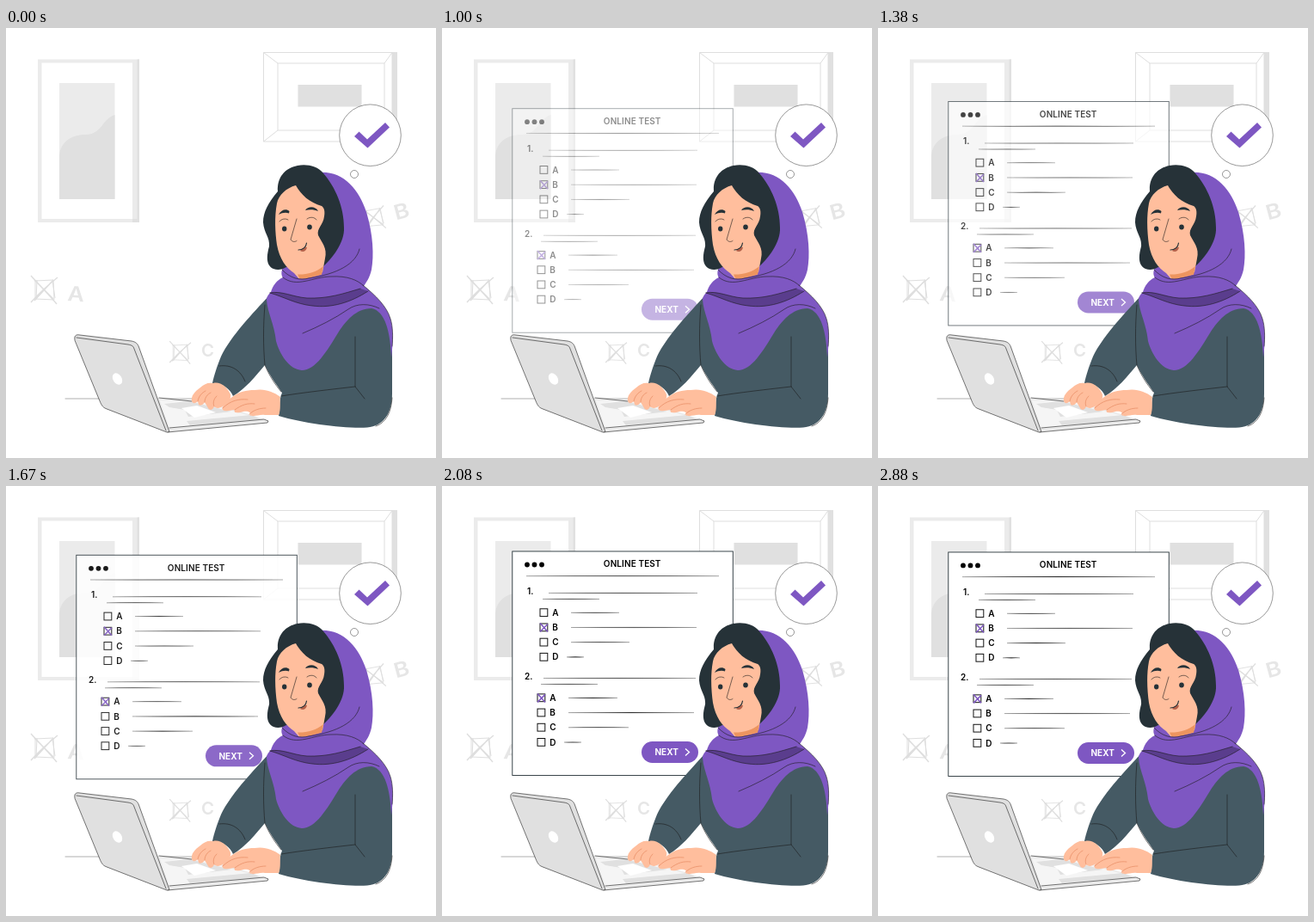
An HTML page that plays this animation: 500 by 500 pixels, repeating every 2.93 s.

```html
<!DOCTYPE html>
<html lang="en">
<head>
<meta charset="utf-8">
<title>Online test</title>
<style>
  html, body { margin: 0; width: 100%; height: 100%; overflow: hidden; background: #fff; }
  svg { display: block; width: 100%; height: 100%; }
  text { font-family: Inter, "Open Sans", sans-serif; font-weight: 600; }
  .ink { fill: none; stroke: #1c1c1c; stroke-width: .6; stroke-linecap: round; stroke-linejoin: round; }
  .pale { fill: none; stroke: #dedede; stroke-width: 1; }
  .skinline { fill: none; stroke: #e58a62; stroke-width: .7; stroke-linecap: round; }
</style>
</head>
<body>
<svg viewBox="0 0 500 500">
  <!-- wall pictures -->
  <path fill="#ebebeb" d="M37 36.500H155V226H37Z"/>
  <path fill="#e0e0e0" d="M152.500 36.500H155V226H147V222H152.500Z"/>
  <path fill="#fff" d="M41.500 40.500H147V222H41.500Z"/>
  <path fill="#ebebeb" d="M62 64H126.500V199H62Z"/>
  <path fill="#e0e0e0" d="M62 148C64 130 79 124 92 124C112 124 111 106 126.500 101V199H62Z"/>
  <path fill="#e0e0e0" d="M449 28H455V132H449Z"/>
  <path class="pale" d="M299.500 28.500H449V132H299.500ZM316 41H440V119H316ZM299.500 28.500L316 41M449 28.500L440 41M299.500 132L316 119M449 132L440 119"/>
  <path fill="#e0e0e0" d="M339.500 66H413.500V91.500H339.500Z"/>

  <!-- scribbled answers on the wall -->
  <defs>
    <g id="cross" class="pale">
      <path d="M-11 -10L10 -11L11 12L-11 11ZM-9 -11L-10 12M9 -10L12 10"/>
      <path stroke-width="1.500" d="M-16 -16C-8 -7 6 7 14 17M15 -14C5 -6 -7 5 -16 15M-12 -11L10 11M10 -11L-12 13"/>
    </g>
  </defs>
  <g fill="#e6e6e6" font-size="24">
    <use href="#cross" x="45" y="304"/>
    <text transform="translate(71 317) rotate(4) scale(1.120 1)">A</text>
    <use href="#cross" transform="translate(203 377) scale(.8)"/>
    <text x="227" y="382" font-size="20.500">C</text>
    <use href="#cross" transform="translate(428 220) rotate(-8) scale(.85)"/>
    <text transform="translate(453.500 223.500) rotate(-15) scale(1.120 1)">B</text>
  </g>
  <path class="ink" stroke-opacity=".6" d="M69 431H240"/>

  <g id="test"></g>

  <!-- thought bubble -->
  <g fill="#fff" stroke="#333" stroke-width=".5">
    <circle cx="423.500" cy="124.700" r="35.800"/>
    <circle cx="405" cy="170" r="4.500"/>
  </g>
  <path fill="#7e57c2" d="M405 126L410.500 120.500L420 129.500L441 110L446 115.500L420.500 139.500Z"/>

  <!-- laptop -->
  <path fill="#ebebeb" d="M176 430L237 434L305 456.500L304 459L188 470Z"/>
  <path fill="#f5f5f5" d="M179 433L228 435L298 455L190 465Z"/>
  <path fill="#e0e0e0" d="M184 437L214 434L262 446L212 452L208 444L190 441Z"/>
  <path fill="#fff" d="M204 442L222 439L244 447L219 453Z"/>
  <path fill="#e0e0e0" d="M210 457L285 450L296 455L214 462Z"/>
  <path class="ink" d="M178 430L216 434M190 465L300 455L305 457L304 459L188 470"/>
  <path fill="#e0e0e0" d="M80 363C79 358 81 356 86 357L146 364C151 365 153 367 154.500 371L190 469.500L187 470L116 442.500C113 441 112 440 110 436Z"/>
  <path class="ink" d="M80 363C79 358 81 356 86 357L146 364C151 365 153 367 154.500 371L190 469.500L187 470L116 442.500C113 441 112 440 110 436ZM82 360L142 368C147 369 148 370 149 373L186 468"/>
  <ellipse cx="129.500" cy="408" rx="5" ry="7.200" fill="#fff" transform="rotate(-32 129.500 408)"/>

  <!-- sleeves and torso -->
  <path fill="#455a64" d="M305 312C288 331 262 357 250 382C245 394 242 404 240 413C251 412 261 420 264 428C279 419 289 406 301 392C306 403 314 414 321 424C317 433 319 443 317 451C347 460 395 466 420 464.500C439 463 449 448 449 425L449 375C448 350 443 334 432 326C402 304 340 302 305 312Z"/>
  <path class="ink" d="M301 322C299 347 299 370 301 392C306 404 313 415 320 423M248 393C262 391 273 398 278 411M406 359V417L417 431M406 417C380 420 344 424 320 428M449 430C448 447 442 459 430 463"/>

  <!-- hands -->
  <g fill="#ffbe9d">
    <path d="M241 413C234 412 231 414 226 418C219 423 215 428 216 434C218 438 221 436 223 434L224 438C227 440 230 437 231 435L235 442C238 446 241 443 242 440C246 444 251 441 254 438C260 434 262 430 261 426C257 417 249 411 241 413Z"/>
    <path d="M319 429C311 423 301 419 289 421C279 421 271 423 263 429C255 435 250 440 252 444C256 447 261 444 266 444C264 448 270 448 276 446C281 445 286 447 283 450C288 453 294 449 301 450L317 450C320 443 318 436 319 429Z"/>
  </g>
  <path class="skinline" d="M223 434C224 428 228 424 232 422M231 435C231 430 234 426 238 424M242 440C240 435 242 431 245 428M252 442C261 433 271 431 281 432M266 444C274 438 281 436 289 437M283 449C288 444 295 442 302 442"/>

  <!-- scarf behind, hair, face -->
  <path fill="#7e57c2" d="M364 168C392 166 410 187 419 214C427 240 428 265 425 281C423 290 419 296 416 300L322 292L321 279L362 270Z"/>
  <path fill="#263238" d="M369 169C362 160 349 158 339 160C324 163 315 174 316 190C305 203 299 214 299 226C300 239 307 243 306 254C303 265 302 276 311 280C316 282 321 281 326 278L365 281C380 268 394 249 393 232C393 208 383 185 369 169Z"/>
  <path fill="#ffbe9d" d="M337 183C326 186 317 194 315 204C312 220 313 238 315 252C318 269 326 279 335 285L341 292L368 284L371 268C374 256 367 249 363 241C361 233 369 229 370 219C371 213 370 209 367 207C353 203 343 194 337 183Z"/>
  <path fill="#ed955f" d="M339 286.500C349 287 361 284 369 277L367 287L342 293Z"/>
  <g fill="#263238">
    <ellipse cx="323.700" cy="233.500" rx="2.700" ry="3"/>
    <ellipse cx="353" cy="231.500" rx="2.800" ry="3"/>
    <path d="M317 217C320 211 326 210 329.500 213L329 215.500C325 214 321 215 317 217ZM348 212C351 207 360 207 363 213C358 211 353 211 348 212Z"/>
  </g>
  <path class="ink" d="M318 225C320 222 325 221 328 223M350 222C354 219 359 220 361 223M338 222L331 246C333 249 336 249 338 247.500" stroke-width="1"/>
  <path fill="#b5624b" d="M342 259C345 255 348 255 350 255C349 260 345 261 342 259Z"/>
  <path fill="none" stroke="#263238" stroke-width="1.200" stroke-linecap="round" d="M340 258C345 258 349 255 349.500 250"/>

  <!-- scarf in front -->
  <path fill="#7e57c2" d="M321 281C330 290 341 293 350 291C370 288 386 280 396 270L415 299C430 311 443 324 447 338C451 352 450 368 448 383C447 354 441 329 425 326C407 326 395 341 387 353C373 376 360 398 344 398C329 397 318 379 314 364C312 344 304 331 303 316C303 312 306 309 308 307C310 300 315 293 322 290C320 288 320 284 321 281Z"/>
  <path fill="#5a3d8d" d="M307 308C320 305 334 313 350 314C374 315 392 309 412 303L421 306C401 319 379 326 356 323C337 321 324 313 307 308Z"/>
  <path class="ink" d="M321 281C330 291 342 294 352 291C386 286 407 274 411 257M322 290C338 303 357 289 378 289C397 288 409 293 416 300M307 308C320 305 334 313 350 314C374 315 392 309 412 303M307 308C324 313 337 321 356 323C379 326 401 319 421 306M345 355C364 347 382 338 398 327C408 320 422 320 434 326M415 299C430 311 443 324 447 338C450 347 450 360 449 370"/>
</svg>
<script>
const LOOP = 2930, LEAD = 45, RISE = 30;
const test = document.getElementById('test');

// Pen line that tapers towards both ends
const pen = (x1, x2, y) =>
  `<path d="M${x1} ${y}Q${(x1 + x2) / 2} ${y - .6} ${x2} ${y}Q${(x1 + x2) / 2} ${y + .6} ${x1} ${y}" stroke="#000" stroke-width=".2"/>`;

const label = (x, y, s, extra = '') => `<text x="${x}" y="${y}" font-size="10" ${extra}>${s}</text>`;

function option(x, y, letter, end, checked) {
  const box = `<rect x="${x}" y="${y - 4.5}" width="8.800" height="8.800" fill="none" stroke="#111"/>`;
  const mark = checked ? `<path d="M${x} ${y - 5}l9 10m0 -9l-9 9M${x + 2} ${y - 3}l5 6" fill="none" stroke="#7e57c2" stroke-width="1.500"/>` : '';
  const start = x + (letter === 'D' ? 31 : 36);
  return box + mark + label(x + 14.2, y + 3.6, letter) + pen(start, end, y);
}

function question(x, y, number, ends, checked) {
  return label(x, y + 3.6, number + '.') +
    ends.map((end, i) => option(x + 15, y + 25 + i * 17.2, 'ABCD'[i], end, i === checked)).join('');
}

test.innerHTML =
  `<rect x="81.800" y="77" width="256.500" height="260.500" fill="#fff" stroke="#263238" stroke-width=".9"/>` +
  [99, 107.5, 116].map(x => `<circle cx="${x}" cy="92.500" r="2.900"/>`).join('') +
  label(221.2, 95.2, 'ONLINE TEST', 'text-anchor="middle" letter-spacing=".1"') +
  pen(98, 322, 105.7) +
  question(99, 123.3, 1, [206, 296, 218, 165], 1) + pen(124, 297, 125.5) + pen(117, 183, 132.5) +
  question(96, 222.4, 2, [204, 293, 217, 162], 0) + pen(118, 295, 224.5) + pen(115, 181, 231.5) +
  `<rect x="232" y="298" width="66" height="25" rx="12.500" fill="#7e57c2"/>` +
  label(247.5, 314.2, 'NEXT', 'fill="#fff" style="font-weight:700"') +
  `<path d="M283 306.500l4.500 4l-4.500 4" fill="none" stroke="#fff" stroke-width="1.300"/>`;

// cubic-bezier(.36, -.01, .5, 1.38)
const bezier = (a, b, s) => 3 * a * s * (1 - s) ** 2 + 3 * b * s * s * (1 - s) + s ** 3;
function ease(p) {
  let lo = 0, hi = 1;
  for (let i = 0; i < 24; i++) {
    const mid = (lo + hi) / 2;
    if (bezier(.36, .5, mid) < p) lo = mid; else hi = mid;
  }
  return bezier(-.01, 1.38, hi);
}

function draw() {
  const t = performance.now() % LOOP;
  const k = ease(Math.min(1, (t + LEAD) / LOOP));
  test.setAttribute('transform', `translate(0 ${RISE * (1 - k)})`);
  test.setAttribute('opacity', Math.max(0, Math.min(1, k)));
  requestAnimationFrame(draw);
}
draw();
</script>
</body>
</html>
```
